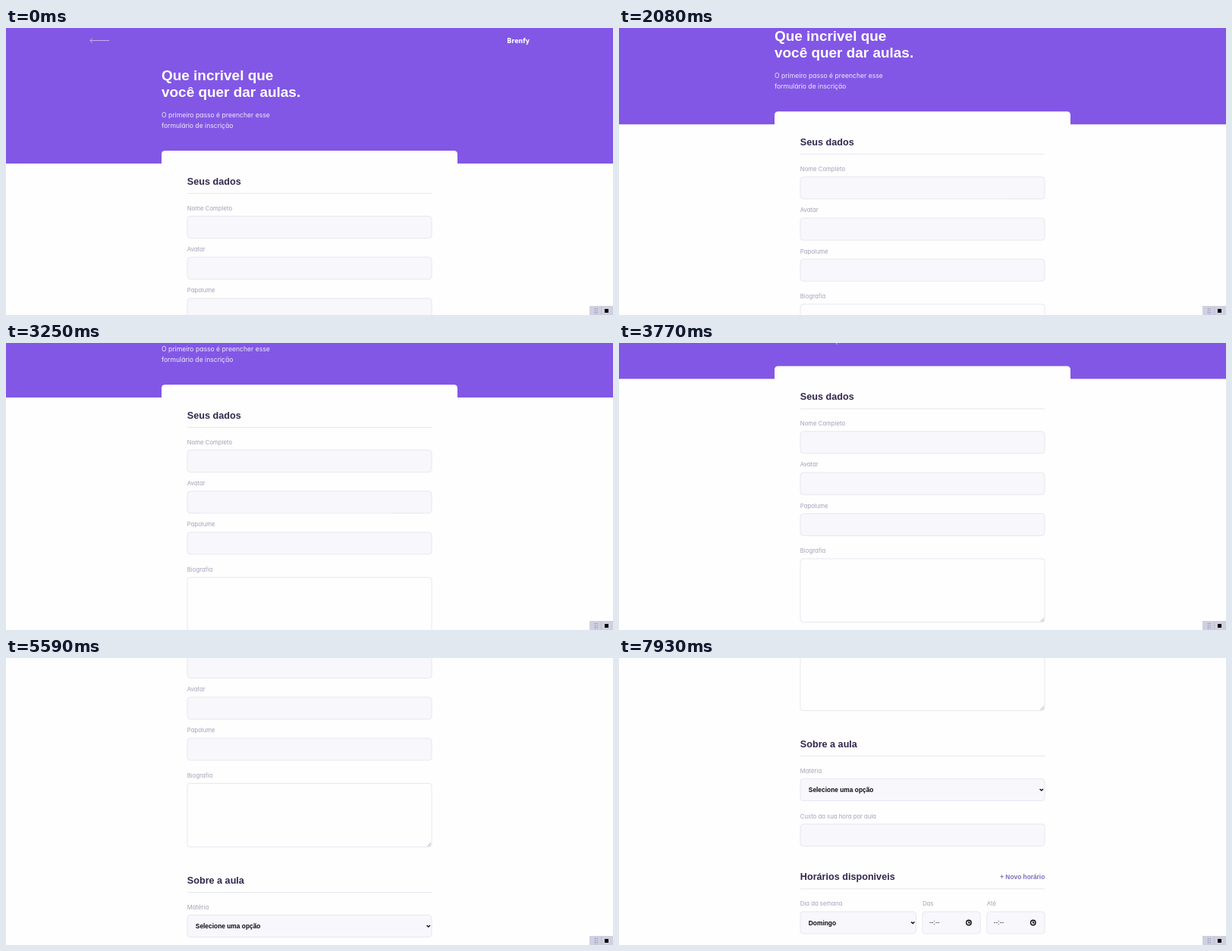
An HTML page for the animation above (8 s loop, 800 by 379 pixels).

```html
<!DOCTYPE html>
<html lang="pt-BR">
<head>
<meta charset="utf-8">
<title>Formulário de aulas</title>
<style>
html, body { margin: 0; width: 100%; height: 100%; overflow: hidden; background: #fefefe; }
svg { display: block; width: 800px; height: 379px; }
text { white-space: pre; }
.title { font: bold 18.95px "Liberation Sans", Arial, sans-serif; fill: #fff; }
.sub { font: 8.6px Inter, sans-serif; font-feature-settings: "cv11"; fill: #f0eafc; }
.logo { font: bold 8px "DejaVu Sans", sans-serif; fill: #fff; }
.legend { font: bold 12.63px "Liberation Sans", Arial, sans-serif; fill: #32264d; }
.label { font: 7.75px Inter, sans-serif; font-feature-settings: "cv11"; fill: #a59fb8; }
.value { font: bold 8.4px "Liberation Sans", Arial, sans-serif; fill: #0c0a12; }
.add { font: bold 8.35px "Liberation Sans", Arial, sans-serif; fill: #7f70bd; }
.time { font: 8.4px "Liberation Sans", Arial, sans-serif; fill: #32264d; }
.field { fill: #f8f8fc; stroke: #e6e6f0; }
.area { fill: #fefefe; stroke: #e6e6f0; }
.rule { stroke: #e6e6f0; }
.ink { fill: none; stroke: #0c0a12; stroke-width: 1.4; }
</style>
</head>
<body>
<svg viewBox="0 0 800 379">
  <g id="page">
    <rect width="800" height="179" fill="#8257e5"/>
    <path d="M136 16.5H111M114 13.3L110.8 16.5L114 19.7" fill="none" stroke="#c5aef3"/>
    <path d="M205 180V166.500a4.500 4.500 0 0 1 4.500-4.500H590.500a4.500 4.500 0 0 1 4.500 4.500V180z" fill="#fefefe"/>
  </g>
  <g id="widget">
    <rect x="769" y="367" width="31" height="12" fill="#cfd0df"/>
    <path d="M784.500 368V379" stroke="#bfc0d2"/>
    <path d="M776.500 370V378M779 370V378" stroke="#6f68a6" stroke-dasharray="1 1.500"/>
    <rect x="789" y="371" width="5" height="5" fill="#000"/>
  </g>
</svg>
<script>
const NS = 'http://www.w3.org/2000/svg';
const page = document.getElementById('page');

function add(tag, cls, attrs, content) {
  const el = document.createElementNS(NS, tag);
  el.setAttribute('class', cls);
  for (const k in attrs) el.setAttribute(k, attrs[k]);
  if (content) el.textContent = content;
  page.appendChild(el);
}
const text = (cls, x, y, str, anchor = 'start') =>
  add('text', cls, { x, y, 'text-anchor': anchor }, str);
const box = (x, y, width, height = 29, cls = 'field') =>
  add('rect', cls, { x, y, width, height, rx: 4 });
const path = (cls, d) => add('path', cls, { d });
const chevron = (x, y) => path('ink', `M${x - 2.2} ${y - 1.1}l2.200 2.200l2.200 -2.200`);

function legend(str, y) {
  text('legend', 238.8, y, str);
  path('rule', `M239 ${y + 11.5}H561`);
}
function field(label, y) {
  text('label', 238.8, y - 7.7, label);
  box(239, y, 322);
}
function timeField(label, x) {
  text('label', x, 758.2, label);
  box(x, 766, 76.3);
  text('time', x + 9, 783, '--:--');
  add('circle', 'ink', { cx: x + 61, cy: 780.5, r: 3.2, 'stroke-width': 1 });
  path('ink', `M${x + 61} 778.500v2.300h1.700`);
}

text('logo', 690, 19.5, 'Brenfy', 'end');
text('title', 205, 69, 'Que incrivel que');
text('title', 205, 91, 'você quer dar aulas.');
text('sub', 205, 118, 'O primeiro passo é preencher esse');
text('sub', 205, 131.6, 'formulário de inscrição');

legend('Seus dados', 207);
field('Nome Completo', 248.5);
field('Avatar', 302.8);
field('Papolume', 357);
text('label', 238.8, 408.8, 'Biografia');
box(239, 416.5, 322, 84, 'area');
path('rule', 'M239 416');
add('path', '', { d: 'M555.500 499.500l4.500-4.500M558 499.500l2-2', stroke: '#8a8892', 'stroke-width': 0.7 });

legend('Sobre a aula', 549);
field('Matéria', 590.5);
text('value', 249.8, 608.4, 'Selecione uma opção');
chevron(556.8, 605);
field('Custo da sua hora por aula', 650.3);

legend('Horários disponiveis', 724.3);
text('add', 561.3, 723, '+ Novo horário', 'end');
text('label', 238.8, 758.2, 'Dia da semana');
box(239, 766, 152.5);
text('value', 249.8, 783.6, 'Domingo');
chevron(387.3, 780.5);
timeField('Das', 400);
timeField('Até', 484.8);

// Scroll position as [ms, px] points, sampled once per step
const LOOP = 8000, STEP = 130;
const keys = [[0, 0], [985, 0], [4800, 180.3], [5460, 251], [6254, 251], [7930, 431]];

function scrollAt(t) {
  for (let i = 1; i < keys.length; i++) {
    const [t0, y0] = keys[i - 1], [t1, y1] = keys[i];
    if (t <= t1) return y0 + (y1 - y0) * (t - t0) / (t1 - t0);
  }
  return keys[keys.length - 1][1];
}

const start = performance.now();
function draw() {
  const t = (performance.now() - start) % LOOP;
  const y = scrollAt(Math.floor(t / STEP) * STEP);
  page.setAttribute('transform', `translate(0 ${-y.toFixed(2)})`);
  requestAnimationFrame(draw);
}
draw();
</script>
</body>
</html>
```
